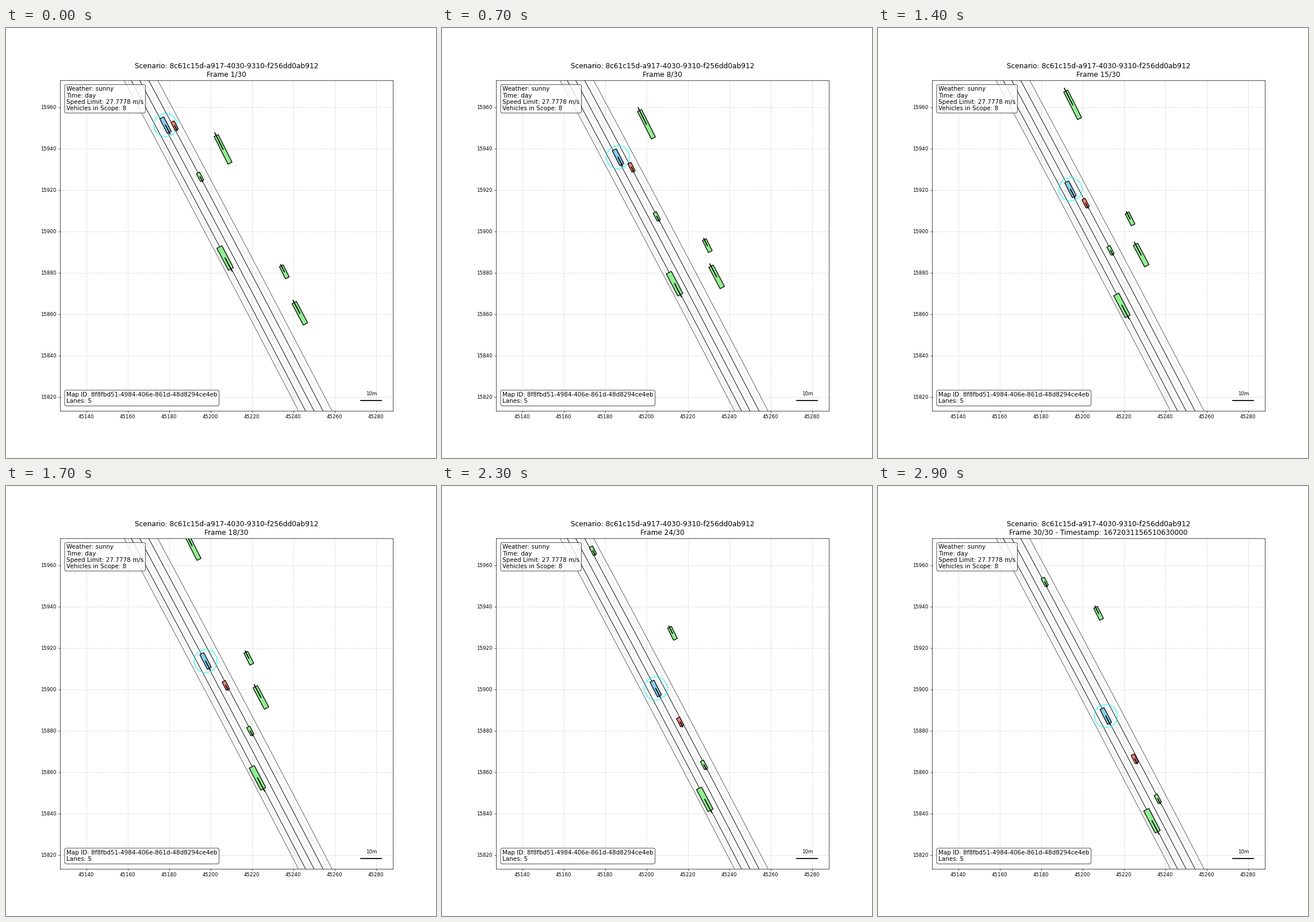
Animation, 748 px wide and 748 px high, one loop 3 s. Source, as a matplotlib script:

```python
import numpy as np
import matplotlib.pyplot as plt
from matplotlib.animation import FuncAnimation
from matplotlib.patches import Circle, Polygon

SIZE = 748
FRAMES = 30
LAST = FRAMES - 1
CX, CY, HALF = 45207.7, 15893.35, 80.0
SCENARIO = "8c61c15d-a917-4030-9310-f256dd0ab912"
MAP_ID = "8f8fbd51-4984-406e-861d-48d8294ce4eb"
TIMESTAMP = "1672031156510630000"
LINE_GAP = 1.14


class Vehicle:
    """Box that drives from start to end, in metres from the view centre.

    bend > 0 slows it down on the way, sway makes the speed waver.
    """

    def __init__(self, ax, color, size, start, end, arrival=LAST,
                 bend=0.0, sway=0.0, seen=(0, LAST)):
        self.start = np.array([CX, CY]) + start
        self.travel = np.subtract(end, start)
        self.arrival, self.bend, self.sway, self.seen = arrival, bend, sway, seen
        ahead = self.travel / np.hypot(*self.travel)
        side = np.array([-ahead[1], ahead[0]])
        l, w = ahead * size[0] / 2, side * size[1] / 2
        self.corners = np.array([-l - w, l - w, l + w, w - l])
        self.pointer = np.array([0 * l, 1.2 * l])
        self.box = ax.add_patch(Polygon(self.corners, closed=True, fc=color,
                                        ec="black", lw=1.5, zorder=4))
        self.nose, = ax.plot([], [], color="black", lw=2, zorder=5)

    def place(self, step):
        shown = self.seen[0] <= step <= self.seen[1]
        self.box.set_visible(shown)
        self.nose.set_visible(shown)
        u = step / self.arrival
        u += self.bend * u * (1 - u) + self.sway * np.sin(2 * np.pi * u)
        centre = self.start + u * self.travel
        self.box.set_xy(centre + self.corners)
        self.nose.set_data(*(centre + self.pointer).T)
        return centre


def draw_lanes(ax):
    edges = [-49.6, -46.2, -42.1, -37.75, -33.4]
    u = np.linspace(0, 1, 40)
    ys = CY + HALF - 2 * HALF * u
    drift = CX + 84.4 * u + 1.4 * u * (1 - u)

    # Shared boundaries are drawn once for each lane and so look darker.
    for left, right in zip(edges[:-1], edges[1:]):
        for edge in (left, right):
            ax.plot(edge + drift, ys, color="black", lw=1, alpha=0.7)
        ax.plot((left + right) / 2 + drift, ys, color="gray", ls="--",
                lw=0.8, alpha=0.5)


def draw_labels(ax):
    style = dict(transform=ax.transAxes, fontsize=12, linespacing=LINE_GAP,
                 bbox=dict(boxstyle="round", facecolor="white", alpha=0.8),
                 zorder=6)
    info = ("Weather: sunny\nTime: day\n"
            "Speed Limit: 27.7778 m/s\nVehicles in Scope: 8")
    ax.text(0.02, 0.981, info, va="top", **style)
    ax.text(0.02, 0.02, f"Map ID: {MAP_ID}\nLanes: 5", va="bottom", **style)
    right, y = CX + HALF - 5, CY - HALF + 5
    ax.plot([right - 10, right], [y, y], color="black", lw=2)
    ax.text(right - 5, y + 2, "10m", fontsize=10, ha="center", va="bottom")


plt.rcParams["font.family"] = "DejaVu Sans"
fig = plt.figure(figsize=(12, 12), dpi=SIZE / 12)
ax = fig.add_axes([0.125, 0.11, 0.775, 0.769])
half_x = HALF * 0.775 / 0.77
ax.set_xlim(CX - half_x, CX + half_x)
ax.set_ylim(CY - HALF, CY + HALF - 0.2)
ax.set_autoscale_on(False)
ax.set_xticks(range(45140, 45281, 20))
ax.set_yticks(range(15820, 15961, 20))
ax.ticklabel_format(useOffset=False, style="plain")
ax.grid(True, linestyle="--", alpha=0.6)
draw_lanes(ax)
draw_labels(ax)
title = ax.set_title("", fontsize=14, pad=6.9, linespacing=LINE_GAP)

ring = ax.add_patch(Circle((CX, CY), 5.6, fill=False, ec="cyan", lw=2,
                           alpha=0.6, zorder=3))
GREEN = "lightgreen"
ego = Vehicle(ax, "skyblue", (8.0, 2.15), (-29.4, 58.0), (3.6, -6.2))
traffic = [
    # Along the road
    Vehicle(ax, "salmon", (4.5, 1.7), (-25.0, 57.7), (17.6, -26.9), bend=-0.025),
    Vehicle(ax, GREEN, (4.4, 1.7), (-12.7, 33.0), (28.7, -46.2)),
    Vehicle(ax, GREEN, (12.0, 2.75), (-0.6, -6.2), (25.9, -56.8), bend=0.02),
    Vehicle(ax, GREEN, (4.3, 1.7), (-63.0, 131.5), (-25.9, 58.6),
            seen=(21, LAST)),
    # Oncoming
    Vehicle(ax, GREEN, (14.9, 2.2), (-1.6, 46.3), (-20.4, 83.7), arrival=20,
            bend=-0.22, sway=0.03),
    Vehicle(ax, GREEN, (6.5, 2.05), (28.0, -12.9), (0.1, 43.4),
            bend=0.06, sway=-0.027),
    Vehicle(ax, GREEN, (11.7, 2.4), (35.5, -32.9), (13.4, 9.0), arrival=20,
            bend=0.2, sway=0.03, seen=(0, 22)),
]


def update(i):
    ring.center = ego.place(i)
    # The tracked traffic misses one update in every ten.
    step = i - (i % 10 == 4)
    for vehicle in traffic:
        vehicle.place(step)
    text = f"Scenario: {SCENARIO}\nFrame {i + 1}/{FRAMES}"
    if i == LAST:
        text += f" - Timestamp: {TIMESTAMP}"
    title.set_text(text)
    return []


anim = FuncAnimation(fig, update, frames=FRAMES, interval=100,
                     repeat=True, repeat_delay=0, blit=False)
plt.show()
```
